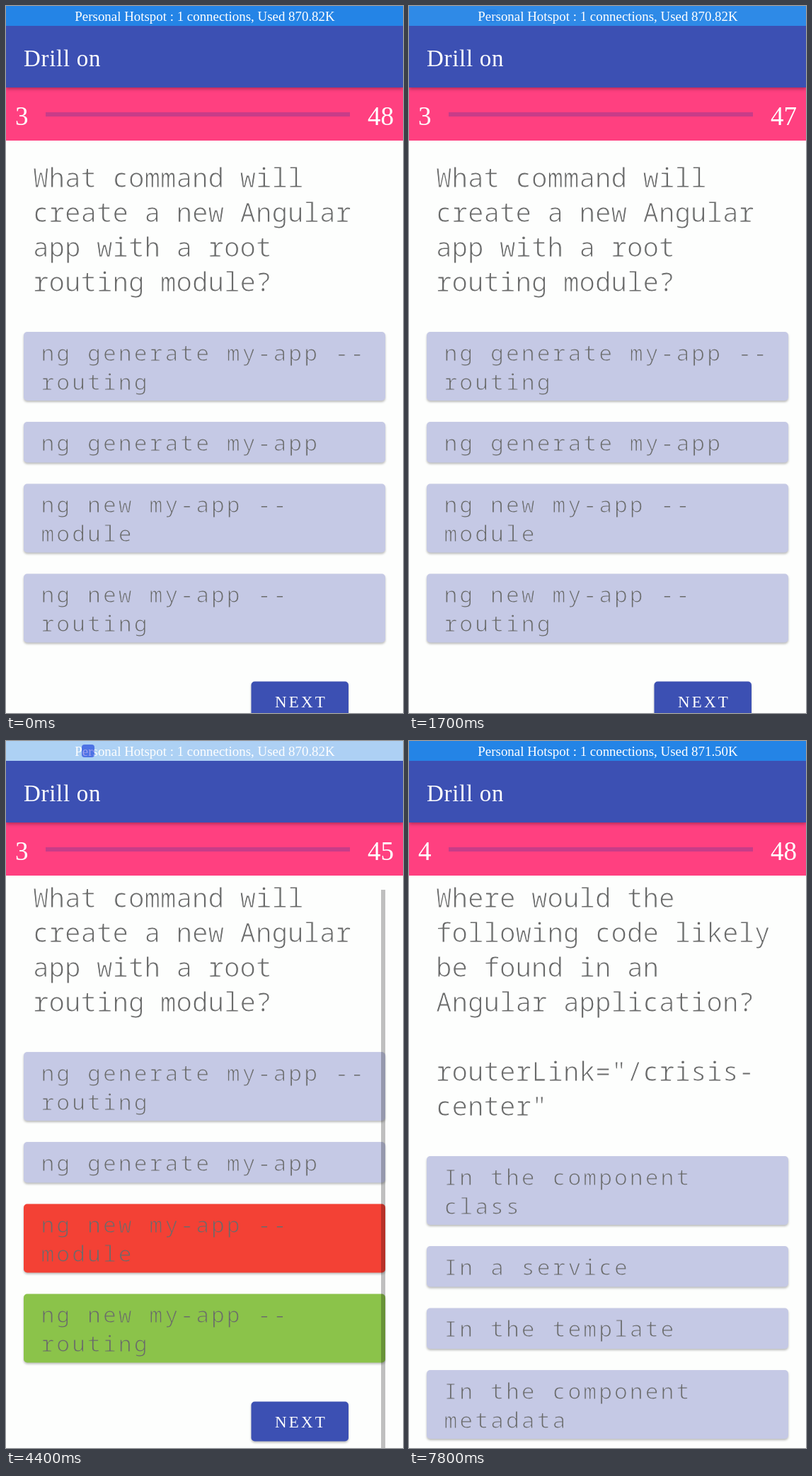
An HTML page for the animation above (8000 ms loop, 561 by 998 pixels).

```html
<!DOCTYPE html>
<html lang="en">
<head>
<meta charset="utf-8">
<title>Quiz</title>
<style>
  html, body { margin: 0; width: 100%; height: 100%; overflow: hidden; background: #fdfefd; }
  svg { display: block; width: 561px; height: 998px; }
  text { white-space: pre; }
  .serif { font-family: "Liberation Serif", "Times New Roman", serif; fill: #fff; }
  /* A stroke in the paper colour thins the letters to a light weight. */
  .mono {
    font-family: "Noto Sans Mono", "DejaVu Sans Mono", monospace; font-weight: 300;
    fill: #6a6b6b; stroke: var(--paper); stroke-width: 1.1px;
  }
  .page { --paper: #fdfefd; }
  .card { --paper: #c5c9e5; }
  .wrong { --paper: #f34135; }
  .right { --paper: #8bc34a; }
  .card rect { fill: var(--paper); }
  .ask { font-size: 37.5px; }
  .answer { font-size: 31.4px; letter-spacing: 3.03px; }
  .lift { filter: drop-shadow(0 2px 1.5px rgba(0, 0, 0, .26)); }
  .bar { filter: drop-shadow(0 2px 2.5px rgba(0, 0, 0, .32)); }
</style>
</head>
<body>
<svg viewBox="0 0 561 998">
  <defs>
    <clipPath id="wrongBox"><rect x="25" y="674" width="511" height="97" rx="6"/></clipPath>
    <clipPath id="column"><rect x="25" y="900" width="511" height="98"/></clipPath>
  </defs>
  <rect width="561" height="998" fill="#fdfefd"/>
  <g clip-path="url(#column)"><circle id="glow" cx="385" r="2900" fill="#f7f8fa"/></g>
  <g id="first" class="page"></g>
  <g id="second" class="page" transform="translate(0 -21)"></g>
  <rect id="scrollbar" x="530" y="210" width="6" height="788" fill="#000"/>

  <rect y="115" width="561" height="75" fill="#ff4080"/>
  <rect x="56" y="150" width="430" height="6" fill="#c83c88"/>
  <text id="number" class="serif" x="13" y="168" font-size="37"></text>
  <text id="clock" class="serif" x="511" y="168" font-size="37"></text>
  <rect class="bar" y="20" width="561" height="95" fill="#3c50b3"/>
  <text class="serif" x="25" y="85" font-size="33" letter-spacing=".7">Drill on</text>

  <rect width="561" height="28" fill="#2484e6"/>
  <text id="usage" class="serif" x="281" y="21" font-size="18.9" text-anchor="middle"></text>
  <g id="flash">
    <rect width="561" height="28" fill="#fdfefd"/>
    <rect x="107" y="5" width="18" height="18" rx="4" fill="#6668e4"/>
  </g>
</svg>
<script>
const $ = id => document.getElementById(id);
const NS = 'http://www.w3.org/2000/svg';

function add(parent, tag, attrs, content = '') {
  const el = document.createElementNS(NS, tag);
  for (const key in attrs) el.setAttribute(key, attrs[key]);
  el.textContent = content;
  parent.append(el);
  return el;
}

// Builds a question with its answer cards; returns the cards.
function page(parent, question, answers, top) {
  question.forEach((line, i) =>
    add(parent, 'text', { class: 'mono ask', x: 38, y: 256 + 49 * i }, line));
  return answers.map(lines => {
    const height = lines.length > 1 ? 97 : 57.5;
    const card = add(parent, 'g', { class: 'card' });
    add(card, 'rect', { class: 'lift', x: 25, y: top, width: 511, height, rx: 5 });
    lines.forEach((line, i) =>
      add(card, 'text', { class: 'mono answer', x: 49.5, y: top + 40.5 + 41.3 * i }, line));
    top += height + 30;
    return card;
  });
}

const cards = page($('first'),
  ['What command will', 'create a new Angular', 'app with a root', 'routing module?'],
  [['ng generate my-app --', 'routing'], ['ng generate my-app'],
   ['ng new my-app --', 'module'], ['ng new my-app --', 'routing']], 460);
add($('first'), 'rect',
  { class: 'lift', x: 346.5, y: 953.5, width: 137.5, height: 56, rx: 5, fill: '#3c50b3' });
add($('first'), 'text',
  { class: 'serif', x: 380, y: 990, 'font-size': 23, 'letter-spacing': 3.2 }, 'NEXT');
const ripple = add(add($('first'), 'g', { 'clip-path': 'url(#wrongBox)' }), 'circle',
  { cx: 390, cy: 700, fill: '#fff' });

page($('second'),
  ['Where would the', 'following code likely', 'be found in an', 'Angular application?', '',
   'routerLink="/crisis-', 'center"'],
  [['In the component', 'class'], ['In a service'], ['In the template'],
   ['In the component', 'metadata']], 607);

const ramp = (t, from, to) => Math.min(1, Math.max(0, (t - from) / (to - from)));
const ease = (t, from, to) => (1 - Math.cos(Math.PI * ramp(t, from, to))) / 2;
const set = (el, attrs) => { for (const key in attrs) el.setAttribute(key, attrs[key]); };

const ANSWERED = 3800, NEXT = 5100;

function draw(t) {
  const answered = t >= ANSWERED, next = t >= NEXT;

  set($('first'), {
    display: next ? 'none' : 'inline',
    transform: `translate(0 ${answered ? -21 : 0})`
  });
  set($('second'), { display: next ? 'inline' : 'none' });
  cards[2].classList.toggle('wrong', answered);
  cards[3].classList.toggle('right', answered);

  set(ripple, {
    r: 60 + 310 * ramp(t, ANSWERED, 4150),
    opacity: answered ? .25 * (1 - ramp(t, 4000, 4350)) : 0
  });
  set($('glow'), {
    cy: 2900 + 967 + 30 * ramp(t, ANSWERED, 4450),
    opacity: answered && !next ? 1 - ramp(t, 4300, 4500) : 0
  });
  set($('scrollbar'), { opacity: answered ? .29 * (1 - ramp(t, 4350, 4700)) : 0 });

  set($('flash'), {
    opacity: ease(t, 0, 600) - ease(t, 1100, 1800) + ease(t, 4050, 4650) - ease(t, 5100, 5800)
  });

  $('number').textContent = next ? 4 : 3;
  $('clock').textContent = next
    ? 50 - Math.floor((t - NEXT) / 1000)
    : answered ? 45 : 48 - Math.min(2, Math.floor(t / 1000));
  $('usage').textContent =
    `Personal Hotspot : 1 connections, Used ${next ? '871.50' : '870.82'}K`;
}

function tick() {
  draw(performance.now() % 8000);
  requestAnimationFrame(tick);
}
tick();
</script>
</body>
</html>
```
